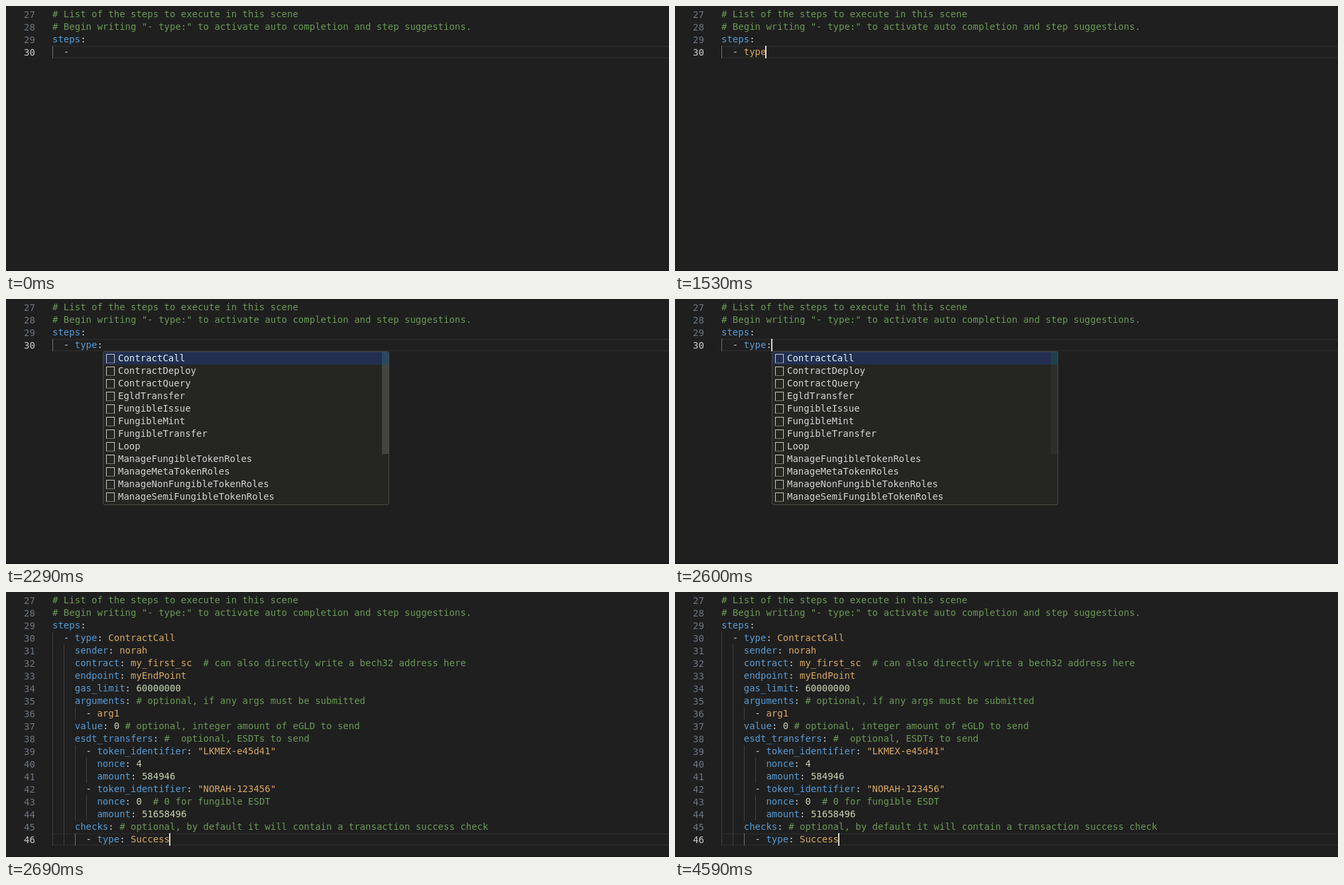
An HTML page that plays this animation: 1000x400 px, repeating every 4.88 s.

```html
<!DOCTYPE html>
<html lang="en">
<head>
<meta charset="utf-8">
<style>
  html, body { margin: 0; width: 100%; height: 100%; overflow: hidden; background: #1f1f1f; }
  body { position: relative; font: 14px/19px "DejaVu Sans Mono", monospace; color: #ccc; white-space: pre; }
  div, i { position: absolute; box-sizing: border-box; }
  .row { left: 0; width: 100%; height: 19px; }
  .num { left: 27px; top: 1px; color: #6e7681; }
  .code { left: 70px; }
  .active .num { color: #ccc; }
  .active::before { content: ""; position: absolute; left: 70px; right: 0; top: 0; height: 19px;
    box-sizing: border-box; border: solid #282828; border-width: 2px 0; }
  .guide { width: 1px; height: 19px; background: #404040; }
  .active .guide:last-of-type { background: #707070; }
  .key { color: #569cd6; }
  .str { color: #d9a862; }
  .val { color: #c8d4b0; }
  .note { color: #6a9955; }
  #cursor { width: 2px; height: 19px; background: #d8d8d0; }
  #popup { left: 146px; top: 79px; width: 432px; height: 232px; background: #252522;
    border: 1px solid #4a4d45; border-radius: 3px; overflow: hidden; color: #d4d4d4; }
  .item { left: 0; width: 100%; height: 19px; padding-left: 22px; }
  .item:first-child { background: #222f50; color: #d8f0f4; }
  .item i { left: 4px; top: 3px; width: 13px; height: 14px; border: 1px solid #c8c8c4; border-bottom-style: dotted; }
  .bar { right: 0; top: 0; width: 10px; height: 154px; }
  #rest { background: linear-gradient(#1e4048 19px, #2d2d2c 19px); }
  #thumb { background: linear-gradient(#2f4b6e 19px, #4c5046 19px); }
  #foot { left: 0; bottom: 0; width: 100%; height: 2px; background: #191919; }
</style>
</head>
<body>
<div id="rows"></div>
<div id="popup"></div>
<div id="cursor"></div>
<div id="foot"></div>
<script>
const LOOP = 4880, CHAR = 8.428;
const $ = id => document.getElementById(id);
$("rows").style.cssText = "left:0;top:3px;width:100%";

const head = [
  "# List of the steps to execute in this scene",
  '# Begin writing "- type:" to activate auto completion and step suggestions.',
  "steps:"
];
const snippet = `  - type: ContractCall
    sender: norah
    contract: my_first_sc  # can also directly write a bech32 address here
    endpoint: myEndPoint
    gas_limit: 60000000
    arguments: # optional, if any args must be submitted
      - arg1
    value: 0 # optional, integer amount of eGLD to send
    esdt_transfers: #  optional, ESDTs to send
      - token_identifier: "LKMEX-e45d41"
        nonce: 4
        amount: 584946
      - token_identifier: "NORAH-123456"
        nonce: 0  # 0 for fungible ESDT
        amount: 51658496
    checks: # optional, by default it will contain a transaction success check
      - type: Success`.split("\n");

const items = ("ContractCall ContractDeploy ContractQuery EgldTransfer FungibleIssue FungibleMint " +
  "FungibleTransfer Loop ManageFungibleTokenRoles ManageMetaTokenRoles " +
  "ManageNonFungibleTokenRoles ManageSemiFungibleTokenRoles").split(" ");
$("popup").innerHTML = items.map((name, i) =>
  `<div class="item" style="top:${i * 19}px"><i></i>${name}</div>`).join("") +
  '<div class="bar" id="rest"></div><div class="bar" id="thumb"></div>';

const span = (cls, text) => text ? `<span class="${cls}">${text}</span>` : "";

function color(line) {
  const [, lead, key, colon = "", gap, value, note] =
    line.match(/^( *(?:- )?)(?:(\w+)(:))?( *)([^#]*)(#.*)?$/);
  return lead + span("key", key) + colon + gap +
    span(/^\d+ *$/.test(value) ? "val" : "str", value) + span("note", note);
}

function row(html, line, i, active) {
  let guides = "";
  for (let g = 0; g < line.search(/[^ ]/) / 2; g++)
    guides += `<i class="guide" style="left:${Math.round(70 + g * 2 * CHAR)}px"></i>`;
  return `<div class="row${active ? " active" : ""}" style="top:${i * 19}px">` +
    `<div class="num">${27 + i}</div>${guides}<div class="code">${html}</div></div>`;
}

const keyTimes = [1020, 1230, 1320, 1530, 1670];
const blinks = [440, 890, 1020, 2120, 2600, 3100, 3660, 4090, 4590];
const fades = [2120, 2210, 2250, 2290, 2430, 2520, 2600];
const passed = (times, t) => times.filter(x => x <= t).length;
let shown = "";

function draw(t) {
  const typed = passed(keyTimes, t), full = t >= 2650, plain = full && t < 2690;
  const state = [typed, full, plain].join();
  if (state !== shown) {
    shown = state;
    const lines = head.concat(full ? snippet : "  - " + "type:".slice(0, typed));
    $("rows").innerHTML = lines.map((line, i) => {
      let html = color(line);
      if (plain && i > 3) html = line;
      if (plain && i === 3) html = color("  - type:") + line.slice(9);
      return row(html, line, i, i === lines.length - 1);
    }).join("");
  }
  const cursor = $("cursor").style;
  cursor.left = Math.floor(69.5 + CHAR * (full ? 21 : 4 + typed)) + "px";
  cursor.top = (full ? 364 : 60) + "px";
  cursor.visibility = passed(blinks, t) % 2 ? "visible" : "hidden";

  $("popup").style.visibility = t >= 1670 && !full ? "visible" : "hidden";
  const step = fades[passed(fades, t) - 1] || 0;
  $("thumb").style.opacity = Math.max(0, Math.min(1, 1 - (step - 2160) / 440));
}

function tick() {
  draw(performance.now() % LOOP);
  requestAnimationFrame(tick);
}
tick();
</script>
</body>
</html>
```
